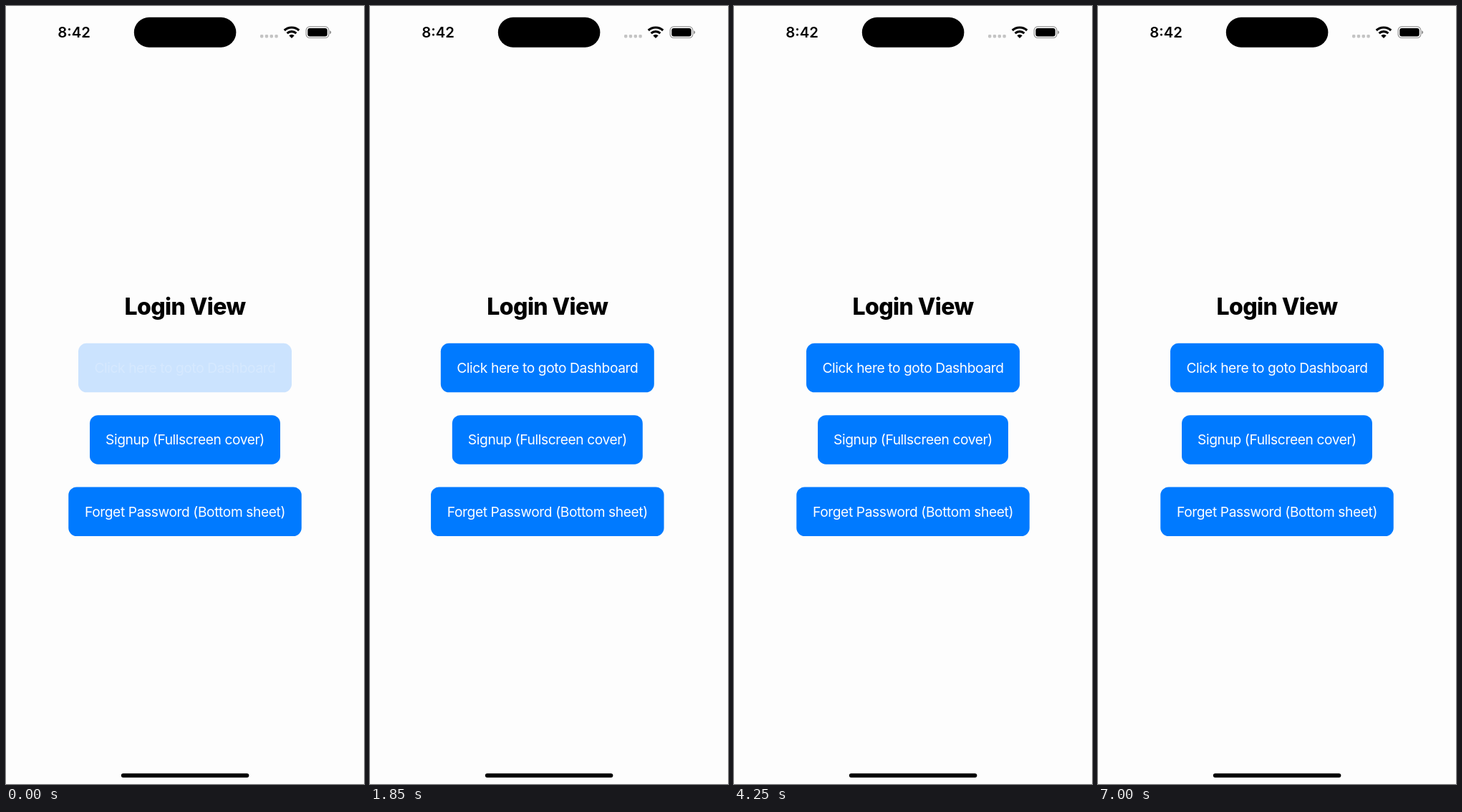
An HTML page for the animation above (7150 ms loop, 500 by 1086 pixels).

```html
<!DOCTYPE html>
<html lang="en">
<head>
<meta charset="utf-8">
<title>Screen navigation</title>
<style>
  html, body { margin: 0; width: 100%; height: 100%; overflow: hidden; background: #000; }
  svg { display: block; width: 100vw; height: 100vh; }
  text { font-family: Inter, Roboto, sans-serif; }
  .title { font-size: 32px; font-weight: 800; letter-spacing: -.59px; text-anchor: middle; }
  .label { font-size: 19.2px; letter-spacing: -.4px; }
  .button text { fill: #fff; text-anchor: middle; }
  .clock { font-size: 20.3px; font-weight: 600; text-anchor: middle; }
</style>
</head>
<body>
<svg id="stage" viewBox="0 0 500 1086">
  <rect width="500" height="1086" fill="#000"/>

  <g id="login">
    <rect id="card" width="500" height="1086" fill="#fdfdfd"/>
    <text class="title" x="250" y="431">Login View</text>
    <g id="loginButtons"></g>
    <rect id="dim" width="500" height="1086" fill="#000"/>
  </g>

  <g id="dashboard">
    <rect width="500" height="1086" fill="#fdfdfd"/>
    <path d="M26.5 80L17 89.2L26.5 98.4" fill="none" stroke="#007aff" stroke-width="2.8"
      stroke-linecap="round" stroke-linejoin="round"/>
    <text class="label" x="38" y="96" fill="#007aff">Back</text>
    <text class="title" x="250" y="531">Hello Dashboard</text>
  </g>

  <g id="signup">
    <rect width="500" height="1086" fill="#fdfdfd"/>
    <text class="title" x="250" y="497">Signup View</text>
  </g>

  <g id="sheet">
    <path id="sheetBody" fill="#fdfdfd"/>
    <text class="title" x="250" y="421.3">Forgot Password View</text>
  </g>

  <rect x="178.8" y="15.8" width="142.6" height="41.9" rx="20.95"/>
  <g id="status" fill="currentColor">
    <text class="clock" x="95" y="44.3">8:42</text>
    <g opacity=".22">
      <rect x="355" y="40" width="4.4" height="4.4" rx="1.4"/>
      <rect x="361.8" y="40" width="4.4" height="4.4" rx="1.4"/>
      <rect x="368.6" y="40" width="4.4" height="4.4" rx="1.4"/>
      <rect x="375.4" y="40" width="4.4" height="4.4" rx="1.4"/>
    </g>
    <g id="wifi" fill="none" stroke="currentColor" stroke-width="3.2"></g>
    <path d="M399 45L395.3 41.2A5.3 5.3 0 0 1 402.7 41.2Z"/>
    <rect x="419.2" y="28.9" width="31.6" height="15.6" rx="4.8" fill="none"
      stroke="currentColor" stroke-width="1.2" opacity=".42"/>
    <path d="M452.2 34.2Q454.2 35 454.2 36.7T452.2 39.2Z" opacity=".45"/>
    <rect x="421.3" y="31" width="27.4" height="11.4" rx="3"/>
  </g>
  <rect x="160.8" y="1071.2" width="178.6" height="5.8" rx="2.9"/>
</svg>

<script>
const LOOP = 7150, STEP = 50, OMEGA = 18.26, SETTLED = 535;
const W = 500, H = 1086, SHEET_TOP = 82;
const BLUE = '#007aff', RED = '#ff3b30';
const $ = id => document.getElementById(id);

function node(parent, tag, attrs, text) {
  const el = document.createElementNS('http://www.w3.org/2000/svg', tag);
  for (const key in attrs) el.setAttribute(key, attrs[key]);
  if (text) el.textContent = text;
  parent.appendChild(el);
  return el;
}

// A button that is pressed and released at the given times.
function button(parent, label, y, w, h, fill, press, release) {
  const g = node(parent, 'g', { class: 'button' });
  const parts = [
    node(g, 'rect', { x: (W - w) / 2, y, width: w, height: h, rx: 11.5, fill }),
    node(g, 'text', { class: 'label', x: W / 2, y: y + h / 2 + 7 }, label)
  ];
  return { parts, press, release };
}

const buttons = [
  button($('loginButtons'), 'Click here to goto Dashboard', 470.8, 298, 68.5, BLUE, 0, 60),
  button($('loginButtons'), 'Signup (Fullscreen cover)', 571.2, 266, 68.5, BLUE, 2600, 2630),
  button($('loginButtons'), 'Forget Password (Bottom sheet)', 671.5, 325.5, 68.5, BLUE, 4600, 4680),
  button($('dashboard'), 'Click here to Logout', 604.3, 196, 46, RED, 1450, 1500),
  button($('signup'), 'Click here to goto Login', 571.2, 251, 68.5, RED, 3600, 3700),
  button($('sheet'), 'Reset and go to back to login', 495, 297, 68.5, RED, 6350, 6430)
];

for (const r of [15, 9.4]) {
  const dx = r * Math.sin(.75), y = 45 - r * Math.cos(.75);
  node($('wifi'), 'path', { d: `M${399 - dx} ${y}A${r} ${r} 0 0 1 ${399 + dx} ${y}` });
}

const clamp = x => Math.max(0, Math.min(1, x));
const smooth = x => (x = clamp(x), x * x * (3 - 2 * x));

// Critically damped spring that comes to rest.
function spring(ms) {
  if (ms <= 0) return 0;
  if (ms >= SETTLED) return 1;
  const x = OMEGA * ms / 1000;
  return 1 - (1 + x) * Math.exp(-x);
}
const shown = (t, open, close) => t < close ? spring(t - open) : 1 - spring(t - close);

function opacity(t, { press, release }) {
  if (t < press) return 1;
  return t < release ? .2 : .2 + .8 * smooth((t - release) / 300);
}

function place(id, x, y, visible) {
  $(id).setAttribute('transform', `translate(${x} ${y})`);
  $(id).setAttribute('visibility', visible ? 'visible' : 'hidden');
}

function sheetPath(lift) {
  const k = clamp(lift / 40), rx = 30 * k, ry = 98 * k, b = H - SHEET_TOP;
  return `M0 12A12 12 0 0 1 12 0H${W - 12}A12 12 0 0 1 ${W} 12V${b - ry}` +
    `A${rx} ${ry} 0 0 1 ${W - rx} ${b}H${rx}A${rx} ${ry} 0 0 1 0 ${b - ry}Z`;
}

function draw(t) {
  const push = shown(t, 60.5, 1510.5);
  const cover = shown(t, 2657, 3699);
  const sheet = shown(t, 4701, 6445);

  for (const b of buttons) {
    const o = opacity(t, b);
    for (const part of b.parts) part.setAttribute('opacity', o);
  }

  // Login slides aside under the dashboard and shrinks behind the sheet.
  const scale = 1 - .092 * sheet;
  const x = -150 * push + W * (1 - scale) / 2;
  $('login').setAttribute('transform', `translate(${x} ${70 * sheet}) scale(${scale})`);
  const radius = sheet > 0 ? 11 + 53 * (1 - sheet) : 0;
  $('card').setAttribute('rx', radius);
  $('dim').setAttribute('rx', radius);
  $('dim').setAttribute('opacity', .1 * push + .125 * sheet);

  place('dashboard', W * (1 - push), 0, push > 0);
  place('signup', 0, H * (1 - cover), cover > 0);

  const lift = (H - SHEET_TOP) * (1 - sheet);
  place('sheet', 0, SHEET_TOP + lift, sheet > 0);
  $('sheetBody').setAttribute('d', sheetPath(lift));

  const tone = Math.round(255 * (smooth((t - 4700) / 400) - smooth((t - 6445) / 400)));
  $('status').setAttribute('color', `rgb(${tone},${tone},${tone})`);
}

let start = null;
function tick(now) {
  if (start === null) start = now;
  const t = (now - start) % LOOP;
  draw(Math.floor(t / STEP) * STEP);
  requestAnimationFrame(tick);
}
draw(0);
requestAnimationFrame(tick);
</script>
</body>
</html>
```
